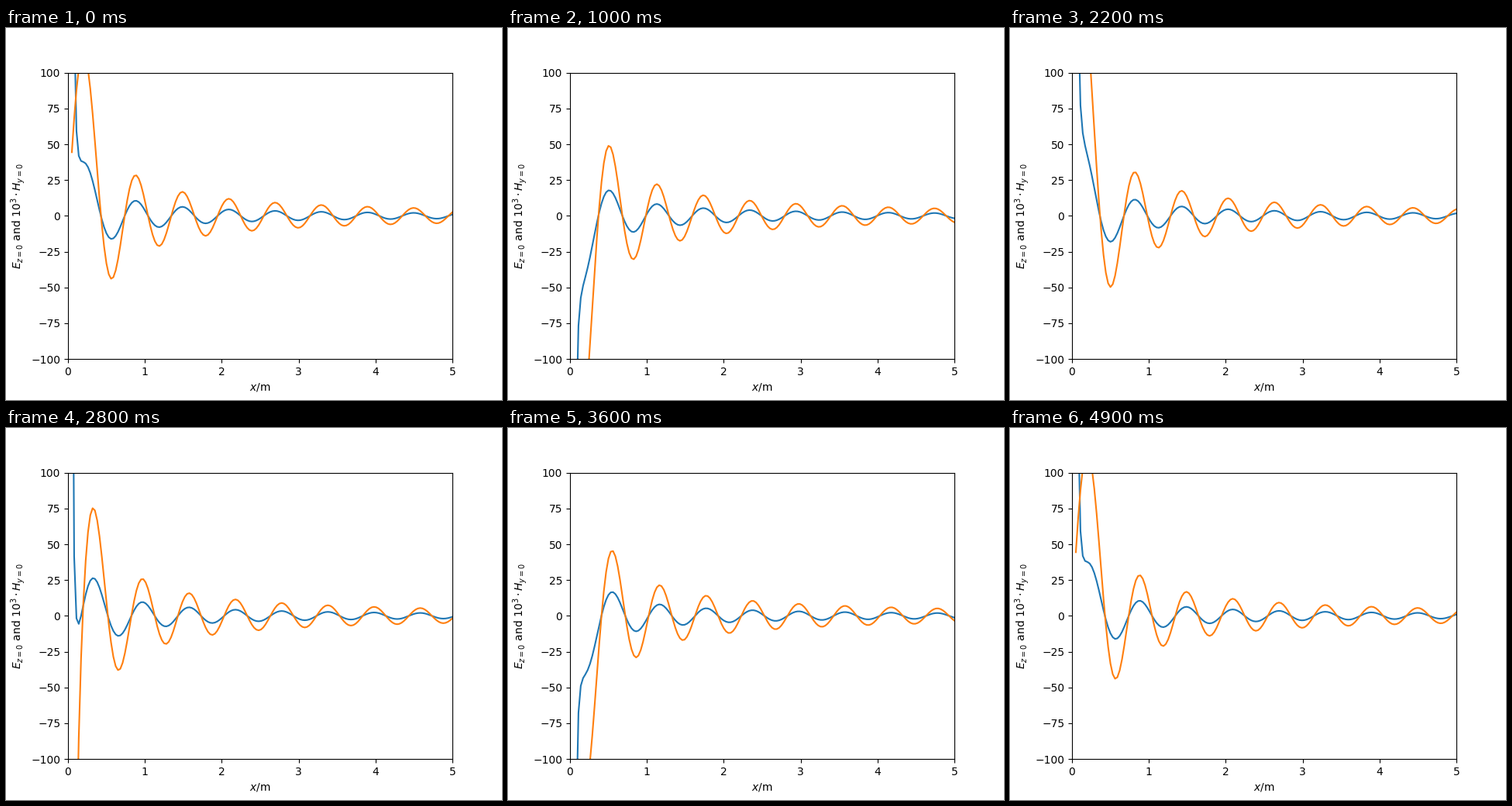
Recreate the animation shown at these times as a matplotlib script. Size 640 by 480 pixels, loop 5000 ms.

```python
import numpy as np
import matplotlib.pyplot as plt
from matplotlib.animation import FuncAnimation

# Near and far field of a short dipole in its equatorial plane
WAVELENGTH = 0.6           # m
CURRENT_MOMENT = 0.03      # A m
IMPEDANCE = 376.73         # ohm
FRAMES = 50
PERIODS = 2

k = 2 * np.pi / WAVELENGTH
x = np.linspace(0.05, 5, 166)
kr = k * x
h_amplitude = CURRENT_MOMENT * k**2 / (4 * np.pi)


def fields(phase):
    wave = 1j * np.exp(1j * (phase - kr))
    h = h_amplitude * (1j / kr + 1 / kr**2) * wave
    e = IMPEDANCE * (h - h_amplitude * 1j / kr**3 * wave)
    return e.real, 1e3 * h.real


fig, ax = plt.subplots(figsize=(6.4, 4.8), dpi=100)
e_line, = ax.plot([], [])
h_line, = ax.plot([], [])
ax.set_xlim(0, 5)
ax.set_ylim(-100, 100)
ax.set_xlabel(r"$x$/m")
ax.set_ylabel(r"$E_{z=0}$ and $10^3\cdot H_{y=0}$")


def update(frame):
    # The last frame closes the cycle, so it repeats the first pose
    phase = 2 * np.pi * PERIODS * frame / (FRAMES - 1)
    e, h = fields(phase)
    e_line.set_data(x, e)
    h_line.set_data(x, h)
    return e_line, h_line


anim = FuncAnimation(fig, update, frames=FRAMES, interval=100, repeat=True)
plt.show()
```
